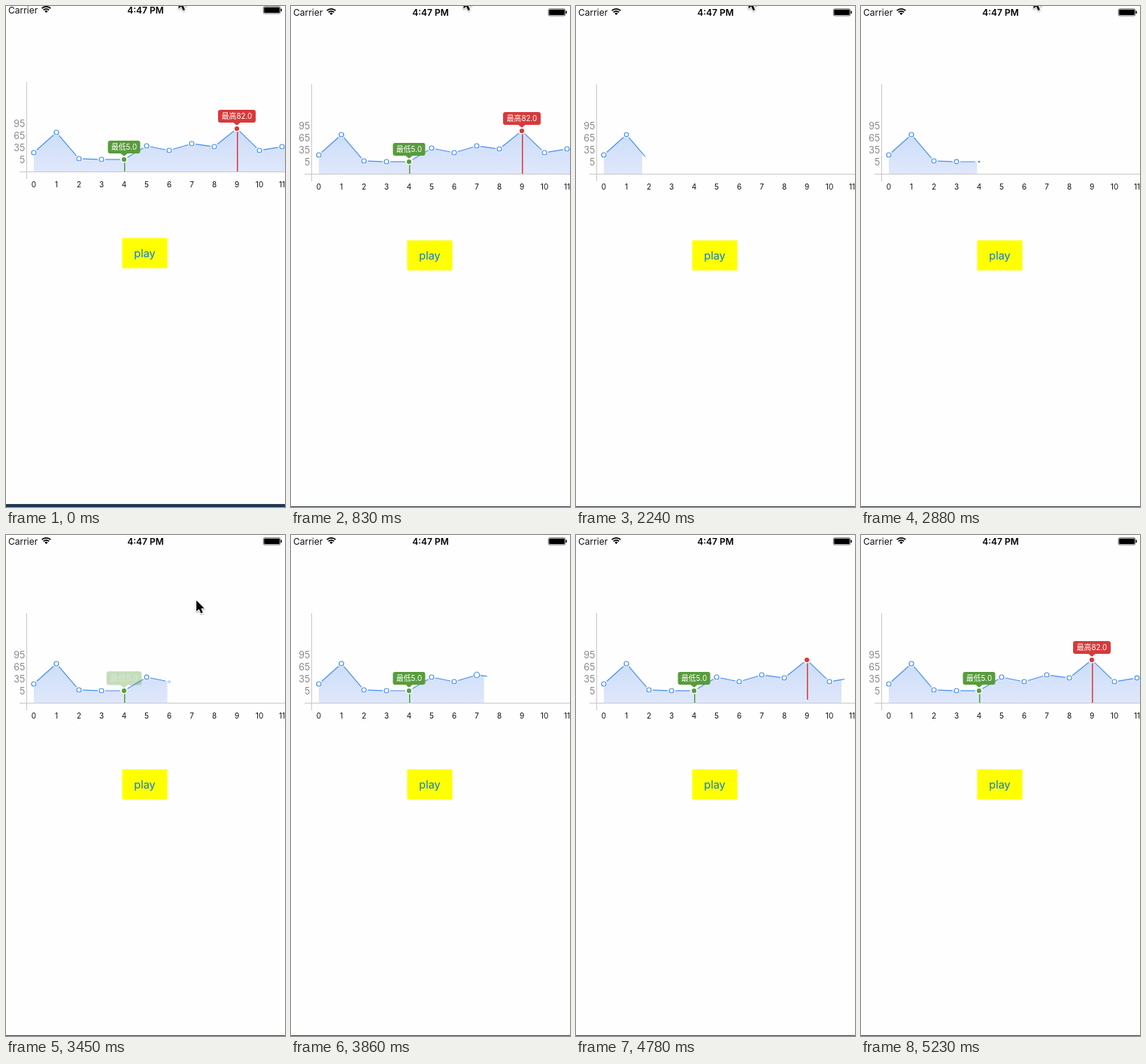
An HTML page with a canvas that plays this animation: 371x666 px, repeating every 5690 ms.

```html
<!DOCTYPE html>
<html lang="en">
<head>
<meta charset="utf-8">
<title>Line chart</title>
<style>
  html, body { margin: 0; width: 100%; height: 100%; overflow: hidden; background: #fefefe; }
  canvas { display: block; width: 371px; height: 666px; }
</style>
</head>
<body>
<canvas id="stage"></canvas>
<script>
const W = 371, H = 666, LOOP = 5690;
const CLEAR = 1720, STEP = 57.66;      // chart restart and its frame pace
const AXIS = 223, X0 = 37, GAP = 30;
const SPEED = 0.1045, DRAW = 1751;     // px per ms, moment the edge leaves X0
const BLUE = '#4990f2', GREEN = '#589c3c', RED = '#d63a3b';
const SANS = 'Inter, "Noto Sans CJK SC", "Noto Sans CJK", sans-serif';

const points = [198, 171, 206, 207, 207, 189, 195, 186, 190, 166, 195, 190, 195]
  .map((y, i) => ({ x: X0 + i * GAP, y }));
const marks = [
  { i: 4, text: '最低5.0', color: GREEN, w: 43 },
  { i: 9, text: '最高82.0', color: RED, w: 50 }
];

const canvas = document.getElementById('stage');
const ctx = canvas.getContext('2d');
const dpr = window.devicePixelRatio || 1;
canvas.width = Math.round(W * dpr);
canvas.height = Math.round(H * dpr);

const clamp = v => Math.max(0, Math.min(1, v));
const popStart = i => DRAW + i * GAP / SPEED - 36;

function rect(x, y, w, h, color) {
  ctx.fillStyle = color;
  ctx.fillRect(x, y, w, h);
}

function disc(x, y, r, color) {
  ctx.fillStyle = color;
  ctx.beginPath();
  ctx.arc(x, y, r, 0, Math.PI * 2);
  ctx.fill();
}

function path(pts, close) {
  ctx.beginPath();
  pts.forEach(([x, y]) => ctx.lineTo(x, y));
  if (close) ctx.closePath();
}

function label(text, x, y, size, color, align = 'center', weight = 400) {
  ctx.font = `${weight} ${size}px ${SANS}`;
  ctx.textAlign = align;
  ctx.fillStyle = color;
  ctx.fillText(text, x, y);
}

function clipTo(x, drawing) {
  ctx.save();
  ctx.beginPath();
  ctx.rect(0, 0, x, H);
  ctx.clip();
  drawing();
  ctx.restore();
}

// Grows past full size, dips slightly, then settles.
function popScale(ms) {
  const keys = [[0, 0.4], [85, 1.32], [240, 0.9], [350, 1]];
  if (ms < 0) return 0;
  for (let k = 1; k < keys.length; k++) {
    const [t0, a] = keys[k - 1], [t1, b] = keys[k];
    if (ms < t1) return a + (b - a) * (1 - Math.cos(Math.PI * (ms - t0) / (t1 - t0))) / 2;
  }
  return 1;
}

function statusBar() {
  label('Carrier', 3, 12.5, 12, '#111', 'left');
  label('4:47 PM', 185.5, 12.5, 12, '#000', 'center', 600);

  ctx.strokeStyle = '#000';
  ctx.lineWidth = 1.7;
  for (const r of [8.2, 5.2]) {
    ctx.beginPath();
    ctx.arc(53.5, 12, r, -Math.PI * 0.75, -Math.PI * 0.25);
    ctx.stroke();
  }
  ctx.fillStyle = '#000';
  ctx.beginPath();
  ctx.moveTo(53.5, 12);
  ctx.arc(53.5, 12, 3, -Math.PI * 0.75, -Math.PI * 0.25);
  ctx.fill();

  ctx.lineWidth = 0.6;
  ctx.beginPath();
  ctx.roundRect(342.3, 3.8, 22.4, 9.2, 1.8);
  ctx.stroke();
  ctx.beginPath();
  ctx.roundRect(343.2, 4.7, 20.6, 7.4, 1);
  ctx.fill();
  ctx.beginPath();
  ctx.roundRect(365.3, 6.6, 1.5, 3.6, 0.7);
  ctx.fill();
}

function axes() {
  rect(27, 104, 1, 129, '#c9c9c9');
  rect(18, AXIS, W - 18, 1, '#c9c9c9');
  [95, 65, 35, 5].forEach((v, i) => label(v, 25.3, 164 + i * 16, 12.4, '#8a8a8a', 'right'));
  for (let i = 0; i < 12; i++) label(i, X0 + i * GAP, 243.7, 10, '#111');
}

function button() {
  rect(154.5, 311.5, 60, 40, '#ffff00');
  label('play', 184.5, 337, 14.5, '#0a78e0');
}

function area() {
  const fill = ctx.createLinearGradient(0, 166, 0, AXIS);
  fill.addColorStop(0, '#cbddf8');
  fill.addColorStop(1, '#dfe7fb');
  const last = points[points.length - 1];
  path([[X0, AXIS], ...points.map(p => [p.x, p.y]), [last.x, AXIS]], true);
  ctx.fillStyle = fill;
  ctx.fill();
}

function segments() {
  ctx.strokeStyle = BLUE;
  ctx.lineWidth = 1.2;
  for (let i = 1; i < points.length; i++) {
    const a = points[i - 1], b = points[i];
    const d = Math.hypot(b.x - a.x, b.y - a.y);
    const ux = (b.x - a.x) / d * 5.2, uy = (b.y - a.y) / d * 5.2;
    path([[a.x + ux, a.y + uy], [b.x - ux, b.y - uy]]);
    ctx.stroke();
  }
}

function dot(i, t) {
  const s = popScale(t - popStart(i));
  if (!s) return;
  const { x, y } = points[i];
  const mark = marks.find(m => m.i === i);
  disc(x, y, 4.4 * Math.min(s, 1), '#fefefe');
  if (mark) {
    disc(x, y, 3.1 * s, mark.color);
  } else {
    ctx.strokeStyle = BLUE;
    ctx.lineWidth = 1.2 * Math.min(s, 1);
    ctx.beginPath();
    ctx.arc(x, y, 3 * s, 0, Math.PI * 2);
    ctx.stroke();
  }
}

function stem(m, t) {
  const p = points[m.i];
  const grow = clamp((t - popStart(m.i) - 200) / 300);
  rect(p.x, p.y + 3, 1.5, (AXIS - p.y - 3) * grow, m.color);
}

function bubble(m, t) {
  const k = clamp((t - popStart(m.i) - 500) / 250);
  if (!k) return;
  const { x, y } = points[m.i];
  const s = 1 + 0.2 * (1 - k) ** 2;
  ctx.save();
  ctx.globalAlpha = k;
  ctx.translate(x, y - 15);
  ctx.scale(s, s);
  ctx.fillStyle = m.color;
  ctx.beginPath();
  ctx.roundRect(-m.w / 2, -10, m.w, 17, 3);
  ctx.moveTo(-4.5, 7);
  ctx.lineTo(0, 10.7);
  ctx.lineTo(4.5, 7);
  ctx.fill();
  label(m.text, 0, 2.2, 9.8, '#fff');
  ctx.restore();
}

function chart(t) {
  const edge = X0 + Math.max(0, t - DRAW) * SPEED;
  clipTo(edge, area);
  clipTo(edge + (edge > X0 ? 4 : 0), segments);
  marks.forEach(m => stem(m, t));
  for (let i = 0; i < 12; i++) dot(i, t);
  marks.forEach(m => bubble(m, t));
}

function cursor(t) {
  let x = 229, y = -11;
  if (t >= 3450) {
    const k = (t - 3450) / 180;
    if (k > 1.2) return;
    x = 252 + 67 * clamp(k);
    y = 85 + 212 * clamp(k);
  }
  ctx.save();
  ctx.translate(x, y);
  path([[0.5, 0], [0.5, 14.5], [4, 11.4], [6.5, 17], [9, 16], [6.6, 10.5], [11, 10.3]], true);
  ctx.shadowColor = 'rgba(0,0,0,.35)';
  ctx.shadowBlur = 2 * dpr;
  ctx.shadowOffsetY = dpr;
  ctx.lineWidth = 1.8;
  ctx.lineJoin = 'round';
  ctx.strokeStyle = '#fff';
  ctx.stroke();
  ctx.shadowColor = 'transparent';
  ctx.fillStyle = '#000';
  ctx.fill();
  ctx.restore();
}

function scrollOffset(t) {
  if (t < 60) return -3;
  if (t < 235) return -2;
  return t < 710 ? -1 : 0;
}

function draw(t) {
  // Before the restart the finished chart is shown.
  const time = t < CLEAR ? LOOP : CLEAR + Math.floor((t - CLEAR) / STEP + 0.1) * STEP;
  ctx.setTransform(dpr, 0, 0, dpr, 0, 0);
  rect(0, 0, W, H, '#fefefe');
  ctx.save();
  ctx.translate(0, scrollOffset(t));
  rect(0, 665, W, 1, '#3b444b');
  rect(0, 666, W, 4, '#17385c');
  statusBar();
  axes();
  button();
  chart(time);
  ctx.restore();
  cursor(t < CLEAR ? 0 : time + 2);
}

const start = performance.now();
function tick() {
  draw((performance.now() - start) % LOOP);
  requestAnimationFrame(tick);
}
tick();
</script>
</body>
</html>
```
